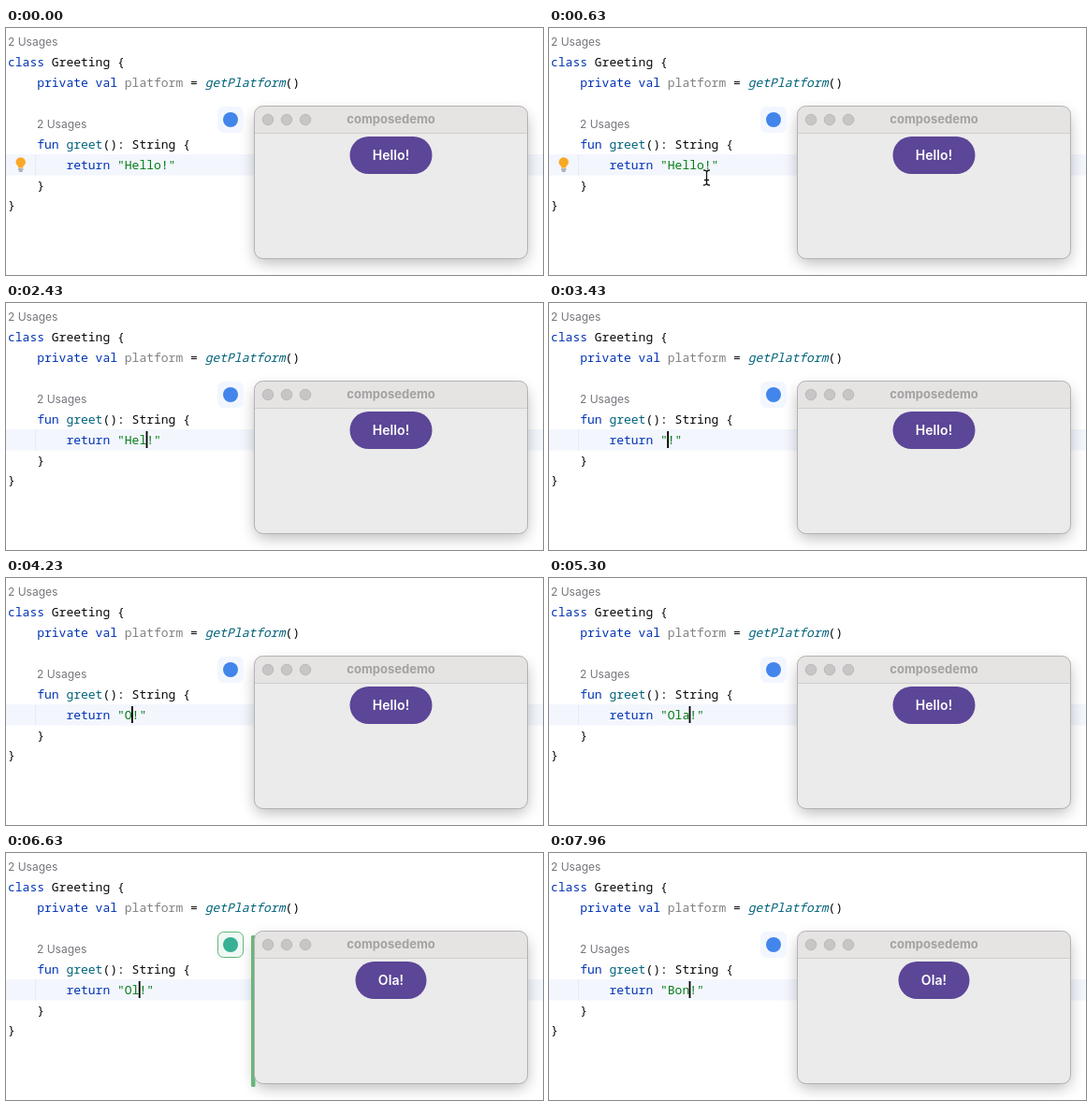
Animation, 574 px wide and 264 px high, one loop 8 s. Source, as an HTML page:

```html
<!DOCTYPE html>
<html lang="en">
<head>
<meta charset="utf-8">
<title>Live code reload</title>
<style>
  html, body { margin: 0; width: 100%; height: 100%; overflow: hidden; background: #fff; }
  svg { display: block; width: 574px; height: 264px; }
  text { white-space: pre; }
  .code { font: 13px "Noto Sans Mono", "DejaVu Sans Mono", monospace; fill: #080808; }
  .hint { font: 12px Inter, sans-serif; fill: #74767c; }
  .key { fill: #0033b3; }
  .fn { fill: #00627a; }
  .str { fill: #067d17; }
  .dim { fill: #808080; }
  .title { font: 700 13px Inter, sans-serif; fill: #a3a2a2; text-anchor: middle; }
  .label { font: 600 14px Inter, sans-serif; letter-spacing: .1px; fill: #fff; text-anchor: middle; }
</style>
</head>
<body>
<svg viewBox="0 0 574 264">
  <defs>
    <filter id="shadow" x="-20%" y="-20%" width="140%" height="150%">
      <feGaussianBlur stdDeviation="8"/>
    </filter>
    <clipPath id="frame"><rect x="265.5" y="83.5" width="292" height="163" rx="9"/></clipPath>
  </defs>
  <rect width="574" height="264" fill="#fff"/>
  <rect y="135" width="574" height="22.5" fill="#f3f6fd"/>
  <path d="M31.5 135V157.5" stroke="#e5eaf5"/>

  <text class="hint" x="2" y="19">2 Usages</text>
  <text class="hint" x="33" y="107">2 Usages</text>
  <g class="code">
    <text x="2" y="41"><tspan class="key">class</tspan> Greeting {</text>
    <text x="33.2" y="63"><tspan class="key">private val</tspan> <tspan class="dim">platform</tspan> = <tspan class="fn" font-style="italic">getPlatform</tspan>()</text>
    <text x="33.2" y="129"><tspan class="key">fun</tspan> <tspan class="fn">greet</tspan>(): String {</text>
    <text x="64.4" y="151"><tspan class="key">return</tspan> <tspan class="str" id="literal"></tspan></text>
    <text x="33.2" y="173">}</text>
    <text x="2" y="194">}</text>
  </g>
  <g id="bulb">
    <path d="M13 149.5V147.6C11.4 146.5 10.5 145 10.5 143.4A5.2 5.2 0 0 1 20.9 143.4C20.9 145 20 146.5 18.4 147.6V149.5Z" fill="#f9a825"/>
    <path d="M13 151H18.4M13.8 153H17.6" stroke="#6c707e" stroke-width="1.1"/>
  </g>
  <rect id="caret" y="137" width="1.8" height="18" fill="#000"/>

  <rect x="266" y="91" width="291" height="160" rx="10" fill="#000" opacity=".27" filter="url(#shadow)"/>
  <rect id="tile" x="226.5" y="84.5" width="27" height="27" rx="6"/>
  <circle id="badge" cx="240" cy="98" r="8"/>
  <rect id="bar" x="262" y="88" width="4.5" height="162" rx="1.5" fill="#68b77a"/>

  <g clip-path="url(#frame)">
    <rect x="265" y="83" width="293" height="164" fill="#ebebeb"/>
    <rect x="265" y="83" width="293" height="29" fill="#e6e4e3"/>
    <path d="M265 112.5H558" stroke="#d0cfce"/>
  </g>
  <rect x="265.5" y="83.5" width="292" height="163" rx="9" fill="none" stroke="#b3b2b2"/>
  <g fill="#c7c5c5" stroke="#b5b3b3" stroke-width=".8">
    <circle cx="280" cy="98" r="5.8"/><circle cx="300" cy="98" r="5.8"/><circle cx="320" cy="98" r="5.8"/>
  </g>
  <text class="title" x="411.5" y="102">composedemo</text>
  <rect id="button" y="116" height="40" rx="20" fill="#5c4697"/>
  <text class="label" id="label" x="411.5" y="141"></text>

  <g id="pointer" fill="none" stroke-linecap="round">
    <path id="beam" d="M-3-8Q0-8 0-5.5Q0-8 3-8M0-5.5V5.5M-3 8Q0 8 0 5.5Q0 8 3 8M-2 2.5H2" stroke="#fff" stroke-width="3"/>
    <use href="#beam" style="stroke:#111"/>
    <path d="M-3-8Q0-8 0-5.5Q0-8 3-8M0-5.5V5.5M-3 8Q0 8 0 5.5Q0 8 3 8M-2 2.5H2" stroke="#111" stroke-width="1.3"/>
  </g>
</svg>
<script>
const LOOP = 8000, CHAR = 7.8, QUOTE_X = 119;
const CLICK = 1250, RELOAD = 5900, FADE = 6850, FADE_END = 7150;
const $ = id => document.getElementById(id);
const clamp = v => Math.min(1, Math.max(0, v));
const mix = (a, b, k) => a + (b - a) * k;
const ease = k => 1 - (1 - k) ** 3;
const span = (t, from, to) => clamp((t - from) / (to - from));
const set = (id, attrs) => {
  for (const name in attrs) $(id).setAttribute(name, attrs[name]);
};
const show = (id, on) => set(id, { visibility: on ? "visible" : "hidden" });
const blend = (a, b, k) => `rgb(${a.map((v, i) => Math.round(mix(v, b[i], k)))})`;

// Each edit leaves this word in front of the exclamation mark.
const edits = [
  [0, "Hello"], [2150, "Hell"], [2400, "Hel"], [2650, "He"], [2900, "H"], [3150, ""],
  [4000, "O"], [4600, "Ol"], [4950, "Ola"],
  [6500, "Ol"], [6750, "O"], [6950, ""],
  [7250, "B"], [7550, "Bo"], [7850, "Bon"]
];

$("pointer").querySelector("use").remove();

function draw(t) {
  const word = edits.filter(e => e[0] <= t).pop()[1];
  $("literal").textContent = `"${word}!"`;
  set("caret", { x: QUOTE_X + CHAR * (word.length + 1) - .6 });
  show("caret", t >= CLICK);
  show("bulb", t < CLICK);

  const enter = ease(span(t, 150, 600));
  const settle = ease(span(t, 750, 1150));
  const x = mix(178, 168.5, enter) - .5 * settle;
  const y = mix(275, 160, enter) - 8 * settle;
  set("pointer", { transform: `translate(${x} ${y})` });
  show("pointer", t >= 150 && t < edits[1][0]);

  const fresh = t >= RELOAD;
  const width = fresh ? 76 : 88;
  $("label").textContent = fresh ? "Ola!" : "Hello!";
  set("button", { x: 411.5 - width / 2, width });

  const glow = fresh ? 1 - span(t, FADE, FADE_END) : 0;
  set("bar", { opacity: glow });
  set("tile", {
    fill: blend([242, 246, 254], [240, 249, 243], glow),
    stroke: blend([242, 246, 254], [95, 181, 122], glow)
  });
  set("badge", { fill: blend([66, 133, 235], [55, 176, 148], glow) });
}

const start = performance.now();
function tick() {
  draw((performance.now() - start) % LOOP);
  requestAnimationFrame(tick);
}
tick();
</script>
</body>
</html>
```
